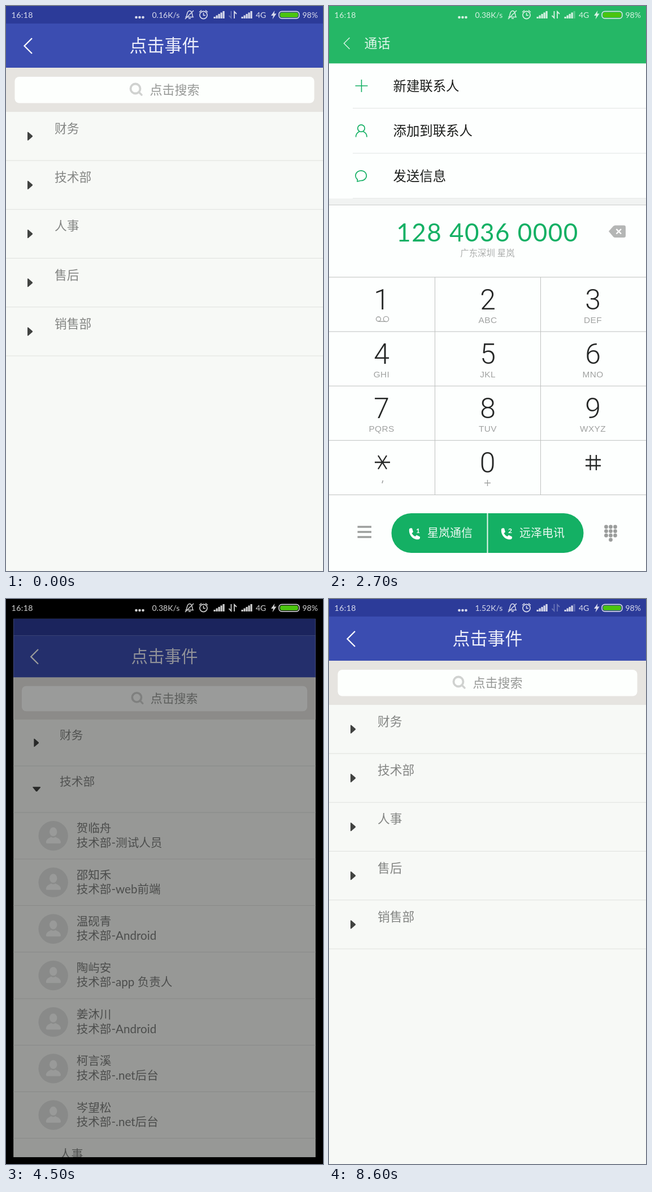
Write an HTML page that moves like this. It is 561 by 998 pixels and loops after 8.7 s.

```html
<!DOCTYPE html>
<html lang="zh-CN">
<head>
<meta charset="utf-8">
<title>点击事件</title>
<style>
html, body { margin: 0; width: 100%; height: 100%; overflow: hidden; background: #000; }
svg { display: block; width: 100%; height: 100%; }
text { font-family: Lato, "Noto Sans CJK SC", "Noto Sans CJK", sans-serif; font-weight: 300; white-space: pre; }
tspan, #speed { font-weight: 400; }
.key { font-family: Roboto, Lato, sans-serif; }
.key tspan { font-weight: 300; }
.sub { font-family: "Liberation Sans", Roboto, sans-serif; }
.bold tspan { font-weight: 700; }
</style>
</head>
<body>
<svg id="stage" viewBox="0 0 561 998" preserveAspectRatio="none">
  <clipPath id="screen"><rect width="561" height="998"/></clipPath>
  <rect width="561" height="998" fill="#000"/>
  <g id="app" clip-path="url(#screen)"></g>
  <g id="dialer"></g>
  <g id="status"></g>
</svg>
<script>
const LOOP = 8700, STEP = 100;
const ROW = 86.25, TOP = 186.75;
const GREEN = '#14b064';
const $ = id => document.getElementById(id);

// Markup helpers; text is placed by its vertical centre, Latin runs a little heavier.
const text = (s, x, y, size, fill, extra = '') =>
  `<text x="${x}" y="${y + size * 0.37}" font-size="${size}" fill="${fill}" ${extra}>${
    String(s).replace(/[ -~]+/g, '<tspan>$&</tspan>')}</text>`;
const mid = (s, x, y, size, fill, extra = '') =>
  text(s, x, y, size, fill, 'text-anchor="middle" ' + extra);
const rect = (x, y, w, h, fill, extra = '') =>
  `<rect x="${x}" y="${y}" width="${w}" height="${h}" fill="${fill}" ${extra}/>`;
const dot = (x, y, r, fill) => `<circle cx="${x}" cy="${y}" r="${r}" fill="${fill}"/>`;
const ring = (x, y, r, color, w = 1) =>
  `<circle cx="${x}" cy="${y}" r="${r}" fill="none" stroke="${color}" stroke-width="${w}"/>`;
const line = (d, color, w = 1, extra = '') =>
  `<path d="${d}" fill="none" stroke="${color}" stroke-width="${w}" ${extra}/>`;
const shape = (d, fill) => `<path d="${d}" fill="${fill}"/>`;
const group = (id, body) => `<g id="${id}">${body}</g>`;

// ---- department list ----
const rowTop = i => TOP + ROW * i;
const divider = i => rect(0, rowTop(i + 1) - 0.5, 561, 1, '#dfe1de');

function department(name, i, open) {
  const y = rowTop(i) + 43.25;
  const arrow = open
    ? `M35.5 ${y - 4}Q35.5 ${y - 4.5} 36.5 ${y - 4.5}H49.5L50.5 ${y - 3.5}L44 ${y + 4}H42Z`
    : `M38 ${y - 7}Q38 ${y - 8} 39.5 ${y - 7.3}L47 ${y - 0.8}V${y + 0.8}L39.5 ${y + 7.3}Q38 ${y + 8} 38 ${y + 7}Z`;
  return shape(arrow, '#414341') + text(name, 86, rowTop(i) + 29, 21.7, '#838583') + divider(i);
}

function person([name, role], n) {
  const i = n + 2, y = rowTop(i) + 43.25;
  return dot(74, y, 27.5, '#e1e3e1')
    + `<ellipse cx="74" cy="${y - 7.5}" rx="7" ry="8.2" fill="#fbfdfb"/>`
    + shape(`M60.5 ${y + 12}C61 ${y + 5} 68 ${y + 3.5} 70 ${y + 2}Q74 ${y + 5} 78 ${y + 2}C80 ${y + 3.5} 87.5 ${y + 5} 88 ${y + 12}Q88 ${y + 14} 86 ${y + 14}H62.5Q60.5 ${y + 14} 60.5 ${y + 12}Z`, '#fbfdfb')
    + text(name, 117, rowTop(i) + 29, 21.6, '#7d7f7d')
    + text('技术部-' + role, 117, rowTop(i) + 55.7, 21.6, '#7d7f7d')
    + divider(i);
}

const people = [
  ['贺临舟', '测试人员'], ['邵知禾', 'web前端'], ['温砚青', 'Android'], ['陶屿安', 'app 负责人'],
  ['姜沐川', 'Android'], ['柯言溪', '.net后台'], ['岑望松', '.net后台']
];
const departments = ['财务', '技术部', '人事', '售后', '销售部'];

$('app').innerHTML =
  rect(0, 0, 561, 998, '#f7f9f6')
  + rect(0, 0, 561, 31, '#2c3b99') + rect(0, 31, 561, 78, '#3b4db1')
  + line('M46 57L32.5 70.5L46 84', '#fff', 2.3)
  + mid('点击事件', 280.5, 70, 31, '#eceefa')
  + rect(0, 109, 561, 78, '#e6e4e0')
  + rect(15.5, 125, 530, 46.5, '#fdfffd', 'rx="8"')
  + ring(229, 146, 8.5, '#d0d2d0', 3.8)
  + line('M235 152L240 157', '#d0d2d0', 3.4, 'stroke-linecap="round"')
  + text('点击搜索', 254.5, 148, 22, '#969896')
  + group('closed', departments.map((d, i) => department(d, i, false)).join(''))
  + group('opened', department('财务', 0, false) + department('技术部', 1, true)
      + people.map(person).join('') + department('人事', 9, false))
  + rect(0, 0, 561, 998, '#000', 'id="dim" opacity="0"');

// ---- dialer ----
function option(label, n, icon) {
  const y = 141 + n * 79.6;
  return icon + text(label, 113.5, y, 23.4, '#1c1e1c') + rect(42, 180 + n * 79.6, 519, 1, '#e2e4e3');
}

const numberView =
  line('M36.5 56L26.5 66L36.5 76', '#d5f3e2', 1.5)
  + text('通话', 62.5, 65, 23, '#e0f6ea')
  + option('新建联系人', 0, line('M46.5 141H68.5M57.5 130V152', GREEN, 1.6))
  + option('添加到联系人', 1, ring(57, 216, 6.2, GREEN, 1.7)
      + line('M47.5 231.5C47.5 226 51 223 54 221.5M60 221.5C64 223 67 226 67 231.5', GREEN, 1.7))
  + option('发送信息', 2, line('M50.5 306.5A9.6 8.8 0 1 1 56 308.5L50 310Z', GREEN, 1.7, 'stroke-linejoin="round"'))
  + rect(0, 340, 561, 11, '#f1f3f2') + rect(0, 351, 561, 1, '#cbcdcc')
  + mid('128 4036 0000', 280.5, 400, 44, GREEN, 'letter-spacing="1.5"')
  + mid('广东深圳 星岚', 280.5, 436, 15.4, '#acaead')
  + shape('M495 398L503 389Q504.500 387.500 506.500 387.500H522Q525 387.500 525 390.500V406Q525 409 522 409H506.500Q504.500 409 503 407.500Z', '#b4b6b5')
  + line('M508.500 394L517 402.500M517 394L508.500 402.500', '#fff', 2.4);

function call(n, number, color, bar, tag, info, sim) {
  const y = 276.5 + n * 98.5;
  return text(number, 42, y, 21.3, color, 'letter-spacing=".5"')
    + rect(bar - 0.5, y - 9, 1, 17, '#8d8f8e')
    + text(tag, bar + 16, y - 1, 18.7, '#929493')
    + text(info, 42, y + 25.5, 18.7, '#929493')
    + line(`M${sim - 7} ${y + 18}H${sim + 4}L${sim + 7} ${y + 21}V${y + 34}H${sim - 7}Z`, '#999b9a', 1, 'stroke-linejoin="round"')
    + mid('1', sim, y + 26, 11, '#777978')
    + ring(519.5, y + 10.5, 16.5, '#d2d4d3')
    + line(`M517 ${y + 5}L522.5 ${y + 10.5}L517 ${y + 16}`, '#a9abaa', 1.3)
    + rect(42, y + 59.5, 519, 1, '#e2e4e3');
}

const logView =
  text('通话', 197.5, 65.5, 21.8, '#f4fcf8') + text('联系人', 297.5, 65.5, 21.8, '#88d8ac')
  + rect(0, 101.4, 561, 73.6, '#eef0ef') + rect(0, 174.5, 561, 1, '#dcdedd')
  + rect(9.5, 111.5, 542, 53, '#fdfffe', 'stroke="#dcdedd"')
  + ring(34.5, 137, 7.6, '#a2a4a3', 1.8) + line('M40 142.500L45 147.500', '#a2a4a3', 2)
  + text('搜索87位联系人', 63.5, 138.5, 18.4, '#a9abaa')
  + text('全部通话', 42, 206.5, 18.5, '#a1a3a2')
  + line('M510 202L519.5 211L529 202', '#999b9a', 1.3)
  + rect(550, 176, 5, 32, '#dfe1e0', 'rx="2"')
  + rect(0, 237, 561, 1, '#dfe1e0')
  + call(0, '000161000102(3)', '#d4533c', 241, '广告推销', '6月4日 响铃10声 河南郑州', 284)
  + call(1, '12800350047', '#1a1c1b', 200, '快递外卖', '6月3日 呼出30秒 河南郑州 远泽', 327.5)
  + line('M301 379L310 370M303 369.5H310.500V377', '#8b8d8c', 1.4)
  + call(2, '000153000760', '#1a1c1b', 213, '广告推销', '', 284);

const KEY = 96.1, PAD = 479;
const colX = [93, 281, 467];
const letters = ['', 'ABC', 'DEF', 'GHI', 'JKL', 'MNO', 'PQRS', 'TUV', 'WXYZ'];
function keypad() {
  let out = rect(0, PAD, 561, 519, '#fdfffe');
  letters.forEach((s, i) => {
    const x = colX[i % 3], y = PAD + Math.floor(i / 3) * KEY;
    out += mid(i + 1, x, y + 38.5, 50, '#252726', 'class="key"')
      + mid(s, x, y + 75, 15.4, '#a0a2a1', 'class="sub" letter-spacing=".4"');
  });
  out += ring(87.5, 553, 4, '#a0a2a1', 1.4) + ring(101, 553, 4.6, '#a0a2a1', 1.4)
    + line('M87.5 557.3H101', '#a0a2a1', 1.4)
    + line('M81 806H108M87 794L102 818M102 794L87 818', '#252726', 2.3)
    + line('M454 801.5H481M454 812H481M462.5 793V820M473 793V820', '#252726', 2.3)
    + mid('0', 280.5, PAD + 3 * KEY + 38.5, 50, '#252726', 'class="key"')
    + line('M95.500 838L94 843', '#a0a2a1', 1.6) + line('M275 842.5H286M280.500 837V848', '#a0a2a1', 1.4);
  for (let i = 0; i < 5; i++) out += rect(0, PAD - 0.5 + i * KEY, 561, 1, '#bfc1c0');
  for (const x of [187, 374]) out += rect(x, PAD, 1, 4 * KEY, '#bfc1c0');
  return out;
}

const handset = (x, n, label) =>
  shape(`M${x} 924Q${x + 1} 921.5 ${x + 5} 922.5L${x + 7} 929L${x + 4.5} 931.5Q${x + 7} 935.5 ${x + 10.5} 937L${x + 13} 934.5L${x + 19} 937.5Q${x + 19.5} 941 ${x + 17} 942C${x + 7} 944 ${x - 1.5} 934 ${x} 924Z`, '#fff')
  + mid(n, x + 15.5, 927, 12, '#fff', 'class="bold"')
  + text(label, x + 32, 931, 20, '#ecf9f2');

function bottomBar() {
  let out = rect(110.5, 896, 340, 70, GREEN, 'rx="35"') + rect(279.5, 896, 2, 70, '#e6f7ee')
    + handset(142, 1, '星岚通信') + handset(305, 2, '远泽电讯');
  for (const y of [920, 929, 938]) out += rect(50.5, y - 1.7, 24.5, 3.4, '#9b9d9c');
  for (let i = 0; i < 9; i++) out += dot(490.5 + (i % 3) * 8, 920 + Math.floor(i / 3) * 7.6, 3.4, '#9b9d9c');
  return out + dot(498.5, 942.8, 3.4, '#9b9d9c');
}

$('dialer').innerHTML =
  rect(0, 0, 561, 998, '#fdfffe') + rect(0, 0, 561, 101.4, '#25b766')
  + group('number', numberView) + group('log', logView) + keypad() + bottomBar();

// ---- status bar ----
function signal(x, id) {
  let out = '';
  for (let i = 0; i < 5; i++) {
    const h = 3 + i * 2.5;
    out += rect(x + i * 4, 22 - h, 3.2, h, '#fff', i === 4 ? `id="${id}"` : '');
  }
  return out;
}

$('status').innerHTML = `<g opacity=".82">`
  + text('16:18', 9.5, 16, 14.2, '#fff', 'letter-spacing=".4"')
  + [230.5, 236.5, 242.5].map(x => dot(x, 20, 2.3, '#fff')).join('')
  + text('', 258.5, 16, 14, '#fff', 'id="speed"')
  + line('M318.500 19.500C321 17 319.500 8.500 325 8.500S329 17 331 19.500ZM323 22H327M317 23L332 8', '#fff', 1.5)
  + ring(349.5, 16, 6.6, '#fff', 1.6)
  + line('M349.500 12V16.500H353M342 11L346 7.500M357 11L353 7.500', '#fff', 1.5)
  + signal(367.5, 'barA')
  + line('M398.500 9V21L394.500 17', '#fff', 1.8, 'id="down"')
  + line('M404 22V10L408 14', '#fff', 1.8, 'id="up"')
  + signal(416.5, 'barB')
  + text('4G', 442, 16, 14, '#fff')
  + shape('M475.500 8L469 17H473L471.500 23.500L478.500 13.500H474.500Z', '#fff')
  + text('98%', 524.5, 16, 14, '#fff')
  + `</g>` + rect(483, 9.5, 36, 12.5, 'none', 'rx="5" stroke="#e8eae9" stroke-width="1.4"')
  + rect(485, 11.5, 32, 8.5, '#4bc40f', 'rx="3"');

// ---- timeline ----
const ramp = (t, a, b) => Math.min(1, Math.max(0, (t - a) / (b - a)));
const easeOut = p => 1 - (1 - p) ** 2;
const within = (t, spans) => spans.some(([a, b]) => t >= a && t < b);
const show = (id, on) => $(id).setAttribute('display', on ? 'inline' : 'none');
const fade = (id, v) => $(id).setAttribute('opacity', v);

function render(t) {
  const open = within(t, [[800, 5300]]);
  show('opened', open);
  show('closed', !open);

  // The list sinks into black, then rises again on return.
  const sink = t < 3400 ? ramp(t, 2140, 2530) : 1 - easeOut(ramp(t, 4320, 4800));
  const k = 1 - 0.12 * sink;
  $('app').setAttribute('transform', `translate(280.5 740) scale(${k}) translate(-280.5 -740)`);
  fade('dim', sink);

  const rise = easeOut(ramp(t, 2330, 2690));
  const fall = ramp(t, 4080, 4496) ** 2;
  $('dialer').setAttribute('transform', `translate(0 ${998 * (1 - rise + fall)})`);
  show('dialer', t > 2330 && t < 4500);

  const swap = ramp(t, 3450, 3650);
  fade('number', 1 - swap);
  fade('log', swap);

  $('speed').textContent = (t < 400 ? '0.16' : t < 6300 ? '0.38' : '1.52') + 'K/s';
  const busy = within(t, [[400, 5200], [6300, 6500], [6900, 7300]]);
  fade('down', busy ? 1 : 0.35);
  fade('up', busy || t < 400 ? 1 : 0.35);
  fade('barB', within(t, [[800, 3600], [5400, LOOP]]) ? 0.3 : 1);
}

// The picture moves in steps of a tenth of a second.
const start = performance.now();
function tick() {
  const t = (performance.now() - start) % LOOP;
  render(Math.floor(t / STEP) * STEP);
  requestAnimationFrame(tick);
}
tick();
</script>
</body>
</html>
```
